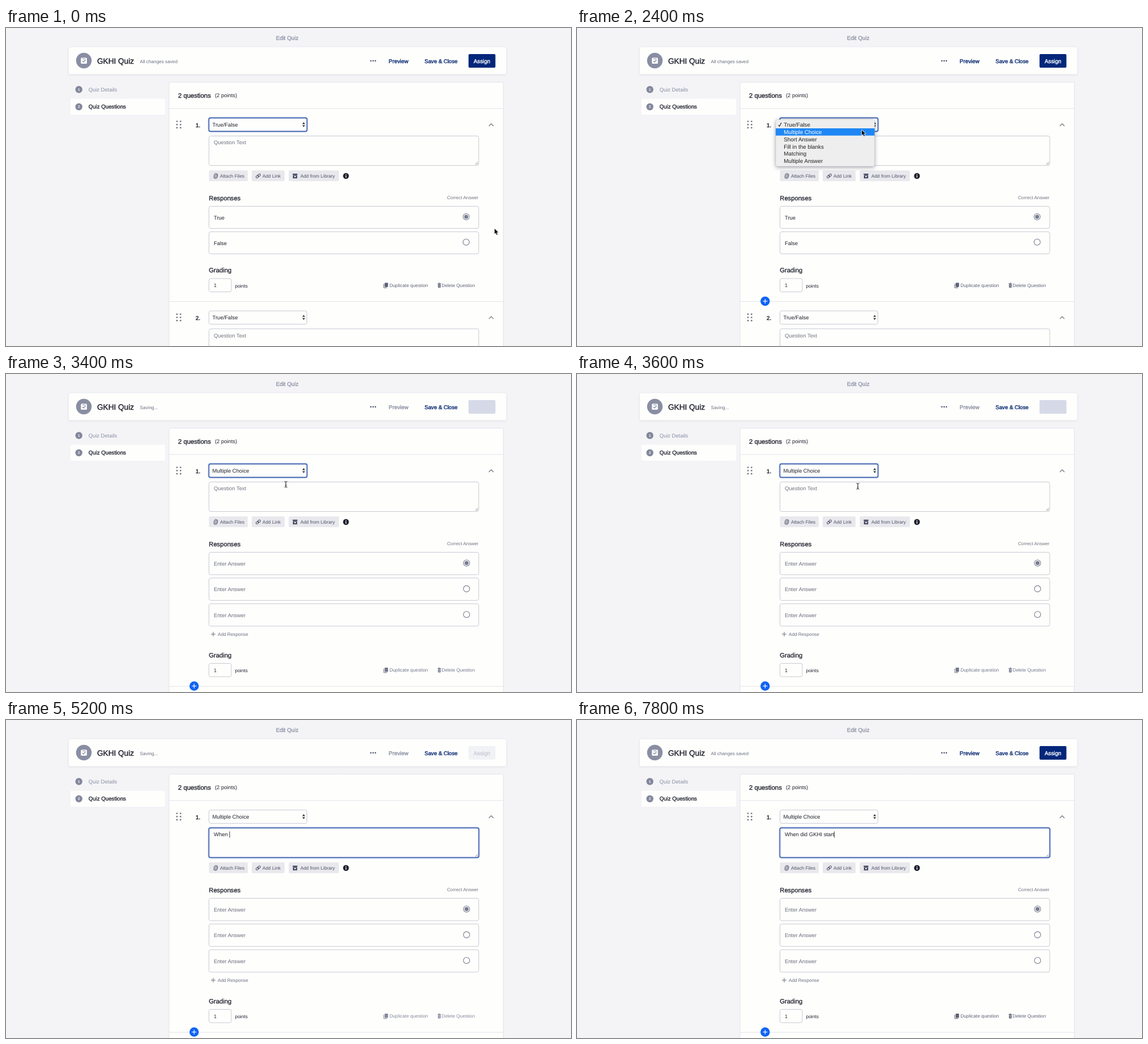
An HTML page with a canvas for the animation above (8000 ms loop, 998x561 px).

```html
<!DOCTYPE html>
<html lang="en">
<head>
<meta charset="utf-8">
<title>Edit Quiz</title>
<style>
html, body { margin: 0; width: 100%; height: 100%; overflow: hidden; background: #f4f4f7; }
canvas { display: block; width: 998px; height: 561px; }
</style>
</head>
<body>
<canvas id="stage" width="998" height="561"></canvas>
<script>
const ctx = document.getElementById('stage').getContext('2d');
const LOOP = 8000, STEP = 200;
const FONT = '"Liberation Sans", Arial, sans-serif';
const INK = '#20222d', GRAY = '#8b8fa2', SLATE = '#5d6175', NAVY = '#02277a', LINE = '#c9cad2', CARD = '#fefefd';
const QUESTION = 'When did GKHI start';
const TYPES = ['True/False', 'Multiple Choice', 'Short Answer', 'Fill in the blanks', 'Matching', 'Multiple Answer'];
const PATH = [
  [0, 863, 354], [600, 800, 319], [1200, 618, 225], [1600, 520, 169], [1800, 520, 169],
  [2400, 503, 180], [2800, 491, 187], [3000, 491, 188], [3600, 496, 198], [4000, 487, 208]
];

// Header looks: [button fill, button text, preview text, link text]
const ON = [NAVY, '#fff', '#0a2a72', SLATE];
const OFF = ['#f1f2f5', '#c5c8d3', '#8d91a3', '#85899b'];
const DIMMING = ['#d6d9e7', '#d6d9e7', '#8d91a3', '#74788b'];
const RISING = ['#dddfe8', '#b3b7c7', '#5b617d', '#808497'];

// y is the middle of the capitals; heavy adds a thin outline for a medium weight
function text(str, x, y, size, color = INK, heavy = 0) {
  ctx.font = `${size}px ${FONT}`;
  ctx.fillStyle = color;
  const base = y + size * 0.36;
  ctx.fillText(str, x, base);
  if (heavy) {
    ctx.strokeStyle = color;
    ctx.lineWidth = heavy;
    ctx.strokeText(str, x, base);
  }
}

function box(x, y, w, h, r, fill, stroke, width = 1) {
  ctx.beginPath();
  ctx.roundRect(x, y, w, h, r);
  if (fill) { ctx.fillStyle = fill; ctx.fill(); }
  if (stroke) { ctx.strokeStyle = stroke; ctx.lineWidth = width; ctx.stroke(); }
}

function disc(x, y, r, fill) {
  ctx.beginPath();
  ctx.arc(x, y, r, 0, 7);
  ctx.fillStyle = fill;
  ctx.fill();
}

function line(color, width, ...pts) {
  ctx.beginPath();
  for (let i = 0; i < pts.length; i += 2) ctx.lineTo(pts[i], pts[i + 1]);
  ctx.strokeStyle = color;
  ctx.lineWidth = width;
  ctx.stroke();
}

function shape(fill, ...pts) {
  ctx.beginPath();
  for (let i = 0; i < pts.length; i += 2) ctx.lineTo(pts[i], pts[i + 1]);
  ctx.closePath();
  ctx.fillStyle = fill;
  ctx.fill();
}

function shadowed(alpha, blur, dy, draw) {
  ctx.save();
  ctx.shadowColor = `rgba(30,35,60,${alpha})`;
  ctx.shadowBlur = blur;
  ctx.shadowOffsetY = dy;
  draw();
  ctx.restore();
}

function field(x, y, w, h, focused) {
  if (focused) {
    box(x, y, w, h, 3, null, '#b4c4ea', 4);
    box(x, y, w, h, 2.5, CARD, '#3559a8', 1.4);
  } else box(x, y, w, h, 3, CARD, LINE);
}

function saveLook(t) {
  if (t < 3400 || t >= 6000) return ON;
  if (t < 3800) return DIMMING;
  return t === 4400 || t === 5800 ? RISING : OFF;
}

function isSaving(t) {
  return (t >= 3400 && t < 4200) || (t >= 4600 && t < 5800);
}

function typedCount(t) {
  if (t < 4400) return 0;
  if (t < 4600) return 1;
  if (t < 4800) return 2;
  if (t < 5200) return 4;
  return 5 + Math.round((t - 5200) / STEP * 14 / 13);
}

function header(t, look) {
  text('Edit Quiz', 477, 17, 9.75, GRAY, 0.3);
  shadowed(0.1, 4, 1, () => box(111, 34, 772.5, 47.5, 3, CARD));
  disc(137.5, 57.5, 13.7, '#8a8ea3');
  box(132.3, 52.5, 10.6, 10.6, 1.5, '#fff');
  line('#8a8ea3', 1.3, 134.8, 58, 136.8, 60, 140.6, 56);
  line('#8a8ea3', 1, 135, 54.5, 140.2, 54.5);
  text('GKHI Quiz', 161, 58.5, 13.6, INK, 0.4);
  text(isSaving(t) ? 'Saving...' : 'All changes saved', 236.5, 59.5, 8.2, '#6b6f80');
  for (let i = -1; i < 2; i++) disc(648.5 + i * 4, 58, 1.15, '#25314f');
  text('Preview', 676, 58.5, 9.75, look[2], 0.4);
  text('Save & Close', 739.3, 58.5, 9.65, '#0a2a72', 0.4);
  box(817, 46, 47.5, 24, 2, look[0]);
  text('Assign', 826, 58.5, 9.8, look[1], look === ON ? 0.4 : 0.25);
}

function sidebar() {
  box(114, 125, 167, 28, 2, CARD);
  [['Quiz Details', 108.5, 9.4, GRAY, 0], ['Quiz Questions', 139, 9.7, INK, 0.3]].forEach(([name, y, size, color, heavy], i) => {
    disc(128.7, y, 6.2, '#83879c');
    text(String(i + 1), 127, y, 6.3, '#fff', 0.2);
    text(name, 145.7, y, size, color, heavy);
  });
}

function questionHead(y, num, type, focused) {
  for (let i = 0; i < 6; i++) disc(302 + (i % 2) * 6.3, y - 5.5 + (i >> 1) * 5.6, 1.4, '#74777f');
  text(num + '.', 335, y + 0.7, 9.8, INK, 0.45);
  field(358.5, y - 11.5, 173, 23.5, focused);
  text(type, 364.5, y, 9.5);
  shape('#333', 523.3, y - 0.9, 525.8, y - 4.2, 528.3, y - 0.9);
  shape('#333', 523.3, y + 1.2, 525.8, y + 4.5, 528.3, y + 1.2);
  line('#6b6e78', 1.2, 853, y + 2.7, 857, y - 1.4, 861, y + 2.7);
}

function textArea(y, focused, typed) {
  field(358.5, y, 476.5, 52, focused);
  line('#777', 0.8, 829, y + 50.5, 833.5, y + 46);
  line('#777', 0.8, 831.5, y + 50.5, 833.5, y + 48.5);
  if (typed) text(typed, 367, y + 11.5, 9.5);
  else text('Question Text', 367, y + 11.5, 9.4, '#70737f');
  if (focused) {
    const end = 367 + (typed ? ctx.measureText(typed).width : 0);
    line('#222', 0.9, end + 0.5, y + 6, end + 0.5, y + 17);
  }
}

function attachRow() {
  [['Attach Files', 358.5, 68.5, 378], ['Add Link', 434, 58, 453], ['Add from Library', 499.5, 88.5, 520]].forEach(([name, x, w, tx]) => {
    box(x, 251.3, w, 19, 2, '#e8e8ed');
    text(name, tx, 261, 8.25, '#4f5367');
  });
  // paper clip
  ctx.save();
  ctx.translate(370.5, 261);
  ctx.rotate(0.25);
  box(-3, -4.2, 6, 8.5, 3, null, '#50546a', 1);
  box(-1, -2.5, 2.4, 5.2, 1.2, null, '#50546a', 0.8);
  ctx.restore();
  // chain link
  ctx.save();
  ctx.translate(445.5, 261);
  ctx.rotate(-0.7);
  box(-4.6, -1.8, 5.2, 3.6, 1.8, null, '#50546a', 1.1);
  box(-0.6, -1.8, 5.2, 3.6, 1.8, null, '#50546a', 1.1);
  ctx.restore();
  // library box
  box(506.3, 257, 8.5, 2, 0.4, '#3f4359');
  box(506.8, 259.6, 7.5, 5.6, 0.5, '#3f4359');
  box(509, 261, 3.2, 2.2, 0, '#e8e8ed');
  disc(600.5, 261, 5.2, '#20232f');
  disc(600.5, 258.6, 0.8, '#fff');
  line('#fff', 1.3, 600.5, 260.2, 600.5, 264);
}

function answer(y, h, label, color, x, ry, chosen) {
  box(358.5, y, 476.5, h, 3, CARD, LINE);
  text(label, 367, y + h / 2 + 0.2, 9.45, color);
  ctx.beginPath();
  ctx.arc(x, ry, 5.5, 0, 7);
  ctx.strokeStyle = '#777b8c';
  ctx.lineWidth = 1.1;
  ctx.stroke();
  if (chosen) disc(x, ry, 3.5, '#777b8e');
}

function responses(multi) {
  text('Responses', 358.3, 300, 11.2, INK, 0.3);
  text('Correct Answer', 779, 299.5, 8.13, '#70737f');
  if (!multi) {
    answer(314.5, 39, 'True', INK, 812.8, 333, true);
    answer(359.5, 39, 'False', INK, 812.8, 377.7, false);
    return;
  }
  for (let i = 0; i < 3; i++)
    answer(314.5 + i * 45.4, 39.5, 'Enter Answer', '#6b6e7b', 813.5, 333.5 + i * 45.4, i === 0);
  line('#666a78', 1, 362, 459, 370, 459);
  line('#666a78', 1, 366, 455, 366, 463);
  text('Add Response', 374, 459, 8.2, '#6b6f80');
}

function grading(dy, color) {
  text('Grading', 358.3, 427.3 + dy, 11.25, INK, 0.3);
  field(358.5, 442 + dy, 39.5, 23.5, false);
  text('1', 367, 454 + dy, 9, '#333');
  text('points', 404.5, 454.7 + dy, 8.4);
  const y = 454 + dy;
  box(668.8, y - 4.5, 6, 7.5, 1, color);
  line(color, 1, 667.2, y - 2.5, 667.2, y + 4.3, 673, y + 4.3);
  text('Duplicate question', 677.2, y, 8.3, color);
  line(color, 1.1, 762.3, y - 3, 768.5, y - 3);
  line(color, 1, 764.2, y - 4, 766.6, y - 4);
  box(763, y - 2, 4.8, 6, 0.7, color);
  line('#fff', 0.5, 764.7, y - 1, 764.7, y + 3);
  line('#fff', 0.5, 766.2, y - 1, 766.2, y + 3);
  text('Delete Question', 769.6, y, 8.18, color);
  line('#e2e3e8', 1, 288, 482.5 + dy, 878, 482.5 + dy);
}

function addButton(y) {
  disc(332.3, y, 8.2, '#0b62f4');
  line('#fff', 1.2, 328.3, y, 336.3, y);
  line('#fff', 1.2, 332.3, y - 4, 332.3, y + 4);
}

function menu(row) {
  shadowed(0.4, 7, 2, () => box(351, 161.5, 174.7, 82.5, 3, '#eeeeee'));
  box(351, 161.5, 174.7, 82.5, 3, null, 'rgba(0,0,0,.14)', 0.6);
  box(351, 164 + row * 12.9, 174.7, 12.8, 0, '#1f87f4');
  TYPES.forEach((name, i) => text(name, 365.3, 170.4 + i * 12.88, 9.85, i === row ? '#fff' : '#222'));
  line(row ? '#222' : '#fff', 1.2, 355.7, 171, 357.6, 173.5, 361, 167);
}

function cursor(t) {
  if (t > 4000) return;
  const i = Math.max(1, PATH.findIndex(p => p[0] >= t));
  const [t0, x0, y0] = PATH[i - 1], [t1, x1, y1] = PATH[i];
  const k = (t - t0) / (t1 - t0);
  const x = x0 + (x1 - x0) * k, y = y0 + (y1 - y0) * k;
  if (t >= 3200) {
    line('#222', 1.1, x, y - 4.5, x, y + 4.5);
    for (const s of [-1, 1]) line('#222', 1, x - 2.5, y + s * 5.3, x, y + s * 4.3, x + 2.5, y + s * 5.3);
    line('#222', 0.9, x - 1.3, y + 1.8, x + 1.3, y + 1.8);
    return;
  }
  const arrow = [0, 0, 0, 9.2, 2.1, 7.2, 3.8, 11, 5.3, 10.3, 3.7, 6.7, 6.6, 6.6].map((v, n) => v + (n % 2 ? y : x));
  ctx.lineJoin = 'round';
  line('#fff', 1.6, ...arrow, arrow[0], arrow[1]);
  shape('#111', ...arrow);
}

function draw(t) {
  const look = saveLook(t);
  const multi = t >= 3200, open = t >= 1800 && t < 3000, writing = t >= 4000;
  const dy = multi ? 68.5 : 0;
  ctx.lineJoin = 'miter';
  ctx.textRendering = 'geometricPrecision';
  ctx.fillStyle = '#f4f4f7';
  ctx.fillRect(0, 0, 998, 561);
  header(t, look);
  sidebar();
  box(288, 95.5, 590.5, 480, 3, CARD, '#e2e3e8');
  text('2 questions', 304, 119, 11.3, INK, 0.35);
  text('(2 points)', 369, 119, 9.4);
  line('#e2e3e8', 1, 288, 142, 878, 142);
  questionHead(170.3, 1, TYPES[+(t >= 3000)], !writing);
  textArea(190.5, writing, QUESTION.slice(0, typedCount(t)));
  attachRow();
  responses(multi);
  grading(dy, look[3]);
  questionHead(510.5 + dy, 2, TYPES[0], false);
  textArea(530.7 + dy, false, '');
  if (t >= 1800) addButton(482 + dy);
  if (open) menu(t < 2200 ? 0 : 1);
  cursor(t);
}

function tick(now) {
  draw(Math.floor(now % LOOP / STEP) * STEP);
  requestAnimationFrame(tick);
}
draw(0);
requestAnimationFrame(tick);
</script>
</body>
</html>
```
